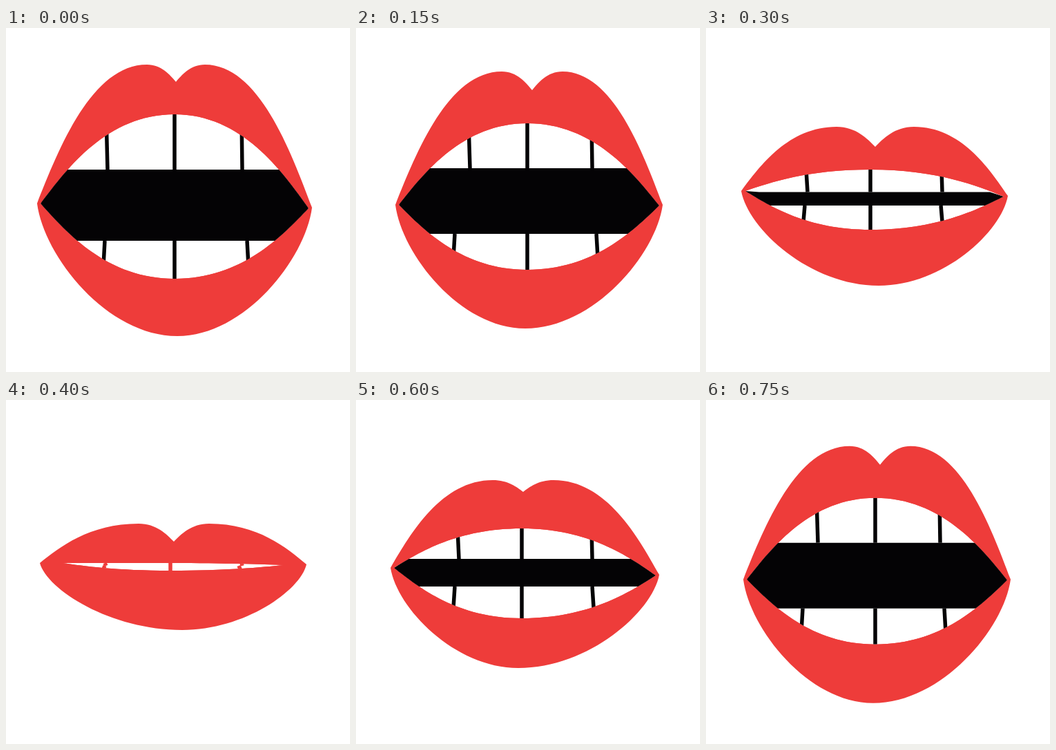
Write an HTML page with a canvas that moves like this. It is 498 px wide and 498 px high and loops after 800 ms.

```html
<!DOCTYPE html>
<html lang="en">
<head>
<meta charset="utf-8">
<title>Talking mouth</title>
<style>
  html, body { margin: 0; width: 100%; height: 100%; overflow: hidden; background: #fff; }
  canvas { display: block; }
</style>
</head>
<body>
<canvas id="stage" width="498" height="498"></canvas>
<script>
const ctx = document.getElementById("stage").getContext("2d");
const RED = "#ee3c3a", BLACK = "#040305";
const LOOP = 800, STEP = 50;

// left, right, bow, chin: key points of the lips; lobe: size of each half of the upper lip.
// inset: lip corner to mouth corner; roof, floor: heights of the mouth; gap: dark band.
// teeth: x of the upper left, middle and lower right lines.
const wide = {
  left: [45, 254], right: [443, 260], bow: [246, 78], lobe: [42, 25], chin: [248, 446],
  inset: [5], roof: [125], floor: [363], gap: [205, 308], teeth: [145, 244, 352], shift: [0, 0]
};
const open = {
  left: [57, 256], right: [444, 256], bow: [255, 90], lobe: [44, 27], chin: [245, 435],
  inset: [5], roof: [138], floor: [350], gap: [203, 298], teeth: [163, 248, 351], shift: [0, 0]
};
const narrow = {
  left: [51, 236], right: [437, 243], bow: [245, 172], lobe: [56, 29], chin: [250, 373],
  inset: [6], roof: [205], floor: [292], gap: [237.5, 257], teeth: [145, 238, 343], shift: [0, 0]
};
const shut = {
  left: [49, 236], right: [435, 238], bow: [243, 205], lobe: [51, 26], chin: [255, 333],
  inset: [33], roof: [236], floor: [247], gap: [240, 240], teeth: [143, 238, 340], shift: [0, 0]
};
const clenched = {
  left: [50, 233], right: [435, 239], bow: [240, 199], lobe: [60, 24], chin: [240, 352],
  inset: [13], roof: [229], floor: [275], gap: [247, 250], teeth: [145, 237, 340], shift: [0, 0]
};
const half = {
  left: [50, 243], right: [439, 253], bow: [242, 133], lobe: [44, 17], chin: [235, 388],
  inset: [5], roof: [186], floor: [316], gap: [230, 270], teeth: [147, 240, 345], shift: [0, 0]
};

const lerp = (a, b, k) => a + (b - a) * k;

function mix(a, b, k) {
  const pose = {};
  for (const part in a) pose[part] = a[part].map((v, i) => lerp(v, b[part][i], k));
  return pose;
}

const keys = [
  [0, wide],
  [50, mix(open, wide, 1.8)],
  [150, open],
  [300, narrow],
  [400, shut],
  [500, clenched],
  [600, half],
  [750, { ...open, shift: [-3, 3.7] }],
  [LOOP, wide]
];

function poseAt(time) {
  const next = keys.findIndex(key => key[0] > time);
  const [t0, a] = keys[next - 1], [t1, b] = keys[next];
  return mix(a, b, (time - t0) / (t1 - t0));
}

// Curve from start over a level apex down to end.
function hump(path, start, apex, end, spread = 0.2) {
  const steep = p => [lerp(p[0], apex[0], spread), lerp(p[1], apex[1], 0.4)];
  const level = p => [lerp(p[0], apex[0], 0.5), apex[1]];
  path.bezierCurveTo(...steep(start), ...level(start), ...apex);
  path.bezierCurveTo(...level(end), ...steep(end), ...end);
}

function lipsPath({ left, right, bow, lobe, chin }) {
  const path = new Path2D(), top = bow[1] - lobe[1];
  path.moveTo(...left);
  hump(path, left, [bow[0] - lobe[0], top], bow);
  hump(path, bow, [bow[0] + lobe[0], top], right);
  hump(path, right, chin, left, 0.05);
  return path;
}

function draw(pose) {
  const { left, right, inset, roof, floor, gap: [top, bottom], teeth, shift } = pose;
  const [upperLeft, middle, lowerRight] = teeth;
  const start = [left[0] + inset[0], left[1]], end = [right[0] - inset[0], right[1] + 1];
  const mouth = new Path2D();
  mouth.moveTo(...start);
  hump(mouth, start, [middle, roof[0]], end);
  hump(mouth, end, [middle, floor[0]], start);

  ctx.fillStyle = "#fff";
  ctx.fillRect(0, 0, 498, 498);
  ctx.save();
  ctx.translate(...shift);
  ctx.fillStyle = RED;
  ctx.fill(lipsPath(pose));
  ctx.clip(mouth);
  ctx.fillStyle = "#fff";
  ctx.fill(mouth);

  const a = start[0] + 20, b = end[0] - 20;
  ctx.fillStyle = BLACK;
  ctx.beginPath();
  [start, [a, top], [b, top], end, [b, bottom], [a, bottom]].forEach(p => ctx.lineTo(...p));
  ctx.fill();

  ctx.strokeStyle = bottom - top < 1 ? RED : BLACK;
  ctx.lineWidth = 5.5;
  ctx.beginPath();
  const tooth = (x, y, lean, gapY) => {
    ctx.moveTo(x, y);
    ctx.lineTo(x + lean, gapY);
  };
  tooth(upperLeft, roof[0], 2, top);
  tooth(middle, roof[0], 0, top);
  tooth(341, roof[0], 1, top);
  tooth(140, floor[0], 3, bottom);
  tooth(middle, floor[0], 0, bottom);
  tooth(lowerRight, floor[0], -3, bottom);
  ctx.stroke();
  ctx.restore();
}

function tick() {
  const time = performance.now() % LOOP;
  draw(poseAt(Math.floor(time / STEP) * STEP));
  requestAnimationFrame(tick);
}
tick();
</script>
</body>
</html>
```
